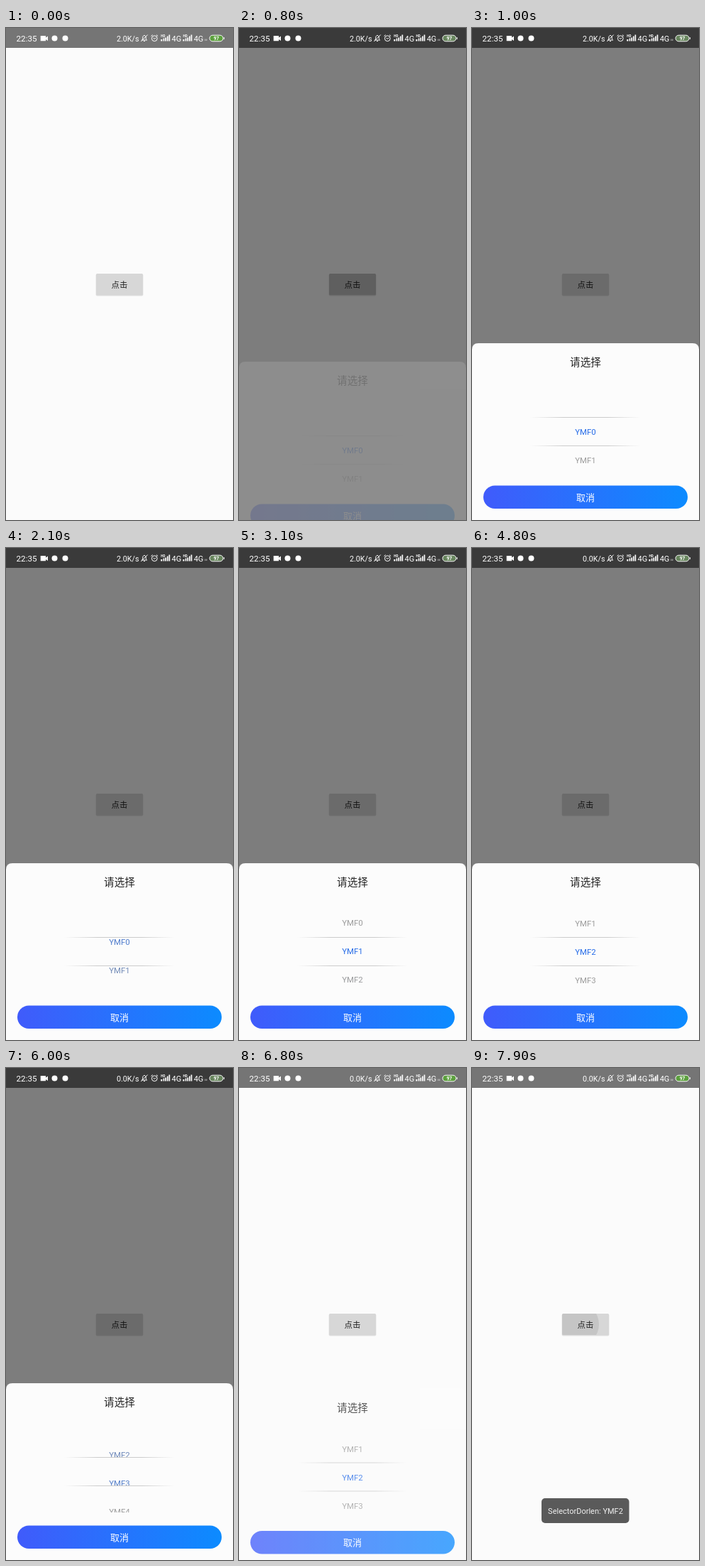
Recreate the animation shown at these times as an HTML page. Size 320 px wide and 693 px high, loop 8000 ms.

```html
<!DOCTYPE html>
<html lang="zh">
<head>
<meta charset="utf-8">
<title>Bottom sheet picker</title>
<style>
  html, body { margin: 0; width: 100%; height: 100%; overflow: hidden; background: #fbfbfb; }
  svg { display: block; width: 100vw; height: 100vh; }
  text { font-family: Roboto, "Noto Sans CJK SC", "Noto Sans CJK", sans-serif; }
  .mid { text-anchor: middle; }
</style>
</head>
<body>
<svg viewBox="0 0 320 693" preserveAspectRatio="none">
  <defs>
    <linearGradient id="blue">
      <stop stop-color="#405bfb"/><stop offset="1" stop-color="#0c8bff"/>
    </linearGradient>
    <linearGradient id="fade">
      <stop stop-color="#ccc" stop-opacity="0"/><stop offset=".3" stop-color="#ccc"/>
      <stop offset=".7" stop-color="#ccc"/><stop offset="1" stop-color="#ccc" stop-opacity="0"/>
    </linearGradient>
    <clipPath id="buttonClip"><rect x="127" y="346" width="66" height="30" rx="1.5"/></clipPath>
    <clipPath id="wheelClip"><rect x="80" y="512" width="160" height="114"/></clipPath>
    <g id="signal">
      <text x="0" y="12.6" font-size="4.6" font-weight="700">HD</text>
      <path d="M0 18.5v-2.5h2v2.5zM3.3 18.5v-4h1.7v4zM6 18.5v-5h1.7v5zM8.6 18.5v-7h1.7v7zM11.2 18.5v-9h1.7v9z"/>
    </g>
  </defs>

  <rect width="320" height="693" fill="#fbfbfb"/>
  <rect width="320" height="28" fill="#757575"/>

  <rect x="126.6" y="346.6" width="66.8" height="31" rx="2" fill="#000" opacity=".1"/>
  <rect x="127" y="346" width="66" height="30.5" rx="1.5" fill="#d7d7d7"/>
  <circle id="ripple" cx="149" cy="361" clip-path="url(#buttonClip)"/>
  <text class="mid" x="160" y="365.5" font-size="11.4" font-weight="500" fill="#222">点击</text>

  <rect id="dim" width="320" height="693"/>

  <g fill="#fff">
    <text x="14.5" y="18.7" font-size="11.7">22:35</text>
    <path d="M48.7 11h7.3v2.5l3-2v6.5l-3-2v2.3h-7.3z"/>
    <circle cx="68.5" cy="14.5" r="4"/>
    <circle cx="83.5" cy="14.5" r="4"/>
    <text id="speed" x="156" y="18.5" font-size="10.7"></text>
    <g fill="none" stroke="#fff">
      <path d="M191 17h8M192 16.5c1-1 .6-4 1.2-5c.8-1.4 2.8-1.4 3.6 0c.6 1 .2 4 1.2 5M194 18.5h2M190.3 19l9.4-9.5"/>
      <circle cx="209.3" cy="14.7" r="3.9"/>
      <path d="M207.5 14l1.8 1.3l2-1.5M204.5 11.4l2.2-1.8M214.1 11.4l-2.2-1.8"/>
    </g>
    <use href="#signal" x="218.3"/>
    <text x="233.5" y="18.7" font-size="11">4G</text>
    <use href="#signal" x="249.4"/>
    <text x="264.7" y="18.7" font-size="11">4G</text>
    <path d="M280.3 15.5h1v2.5h-1zM282.3 15.5h1v2.5h-1z" opacity=".6"/>
    <rect id="battery" x="287" y="10.2" width="19" height="8.6" rx="4.3" stroke="#fff"/>
    <path d="M306.8 13h1v3h-1z"/>
    <text class="mid" x="296.5" y="17" font-size="6.6" font-weight="700">97</text>
  </g>

  <g id="sheet">
    <path d="M0 723V453q0-9 9-9H311q9 0 9 9V723z" fill="#fcfcfc"/>
    <text class="mid" x="160" y="476" font-size="14.6" fill="#222">请选择</text>
    <g id="wheel" clip-path="url(#wheelClip)"></g>
    <rect x="82" y="548" width="156" height="1" fill="url(#fade)"/>
    <rect x="82" y="588" width="156" height="1" fill="url(#fade)"/>
    <rect x="16" y="644.5" width="288" height="32.5" rx="16.25" fill="url(#blue)"/>
    <text class="mid" x="160" y="665.8" font-size="13" fill="#fff">取消</text>
  </g>

  <g id="toast">
    <rect x="98" y="606" width="123.5" height="35" rx="5" fill="#5a5a5a"/>
    <text class="mid" x="160" y="627.7" font-size="11" fill="#f0f0f0">SelectorDorlen: YMF2</text>
  </g>
</svg>
<script>
const LOOP = 8000, STEP = 100, ROW = 40, CENTER = 573;
const $ = id => document.getElementById(id);
const set = (el, attrs) => { for (const k in attrs) el.setAttribute(k, attrs[k]); };
const smooth = u => u * u * (3 - 2 * u);

// Value at time t along [time, value] keys, held flat outside them.
function track(t, keys, ease = u => u) {
  if (t <= keys[0][0]) return keys[0][1];
  for (let i = 1; i < keys.length; i++) {
    const [t0, v0] = keys[i - 1], [t1, v1] = keys[i];
    if (t < t1) return v0 + (v1 - v0) * ease((t - t0) / (t1 - t0));
  }
  return keys[keys.length - 1][1];
}

const DIM = [[500, 0], [800, 1], [6600, 1], [6700, .4], [6800, 0]];
const SHEET = [[700, 0], [800, .13], [900, .7], [1000, 1], [6700, 1], [6800, .75], [6900, .25], [7000, 0]];
const TOAST = [[6900, 0], [7200, 1]];
const SCROLL = [[1700, 0], [2700, 1], [3000, 1], [4200, 2], [4900, 2], [5500, 3], [5700, 3], [6400, 2]];
const RIPPLE_RADIUS = [[100, 30], [400, 62], [7800, 62], [7900, 30]];
const RIPPLE_ALPHA = [[0, 0], [100, .085], [400, .115], [800, .115], [1000, 0], [7800, 0], [7900, .085]];

const items = Array.from({ length: 6 }, (_, i) => {
  const el = document.createElementNS("http://www.w3.org/2000/svg", "text");
  el.textContent = "YMF" + i;
  set(el, { class: "mid", x: 160, "font-size": 11.4 });
  return $("wheel").appendChild(el);
});

const mix = (a, b, u) => `rgb(${a.map((v, i) => Math.round(v + (b[i] - v) * u))})`;

function draw(t) {
  const dim = track(t, DIM), shown = track(t, SHEET), scroll = track(t, SCROLL, smooth);
  set($("dim"), { opacity: dim / 2 });
  set($("battery"), { fill: mix([92, 160, 62], [104, 134, 94], dim) });
  set($("ripple"), { r: track(t, RIPPLE_RADIUS), opacity: track(t, RIPPLE_ALPHA) });
  set($("sheet"), { opacity: shown, transform: `translate(0 ${30 * (1 - shown)})` });
  set($("toast"), { opacity: track(t, TOAST) });
  $("speed").textContent = t < 4000 ? "2.0K/s" : "0.0K/s";
  items.forEach((el, i) => {
    const offset = i - scroll;
    set(el, {
      y: CENTER + offset * ROW,
      fill: mix([38, 108, 232], [156, 156, 156], Math.min(1, Math.abs(offset)))
    });
  });
}

function tick() {
  const t = performance.now() % LOOP;
  draw(Math.floor(t / STEP) * STEP);
  requestAnimationFrame(tick);
}
tick();
</script>
</body>
</html>
```
